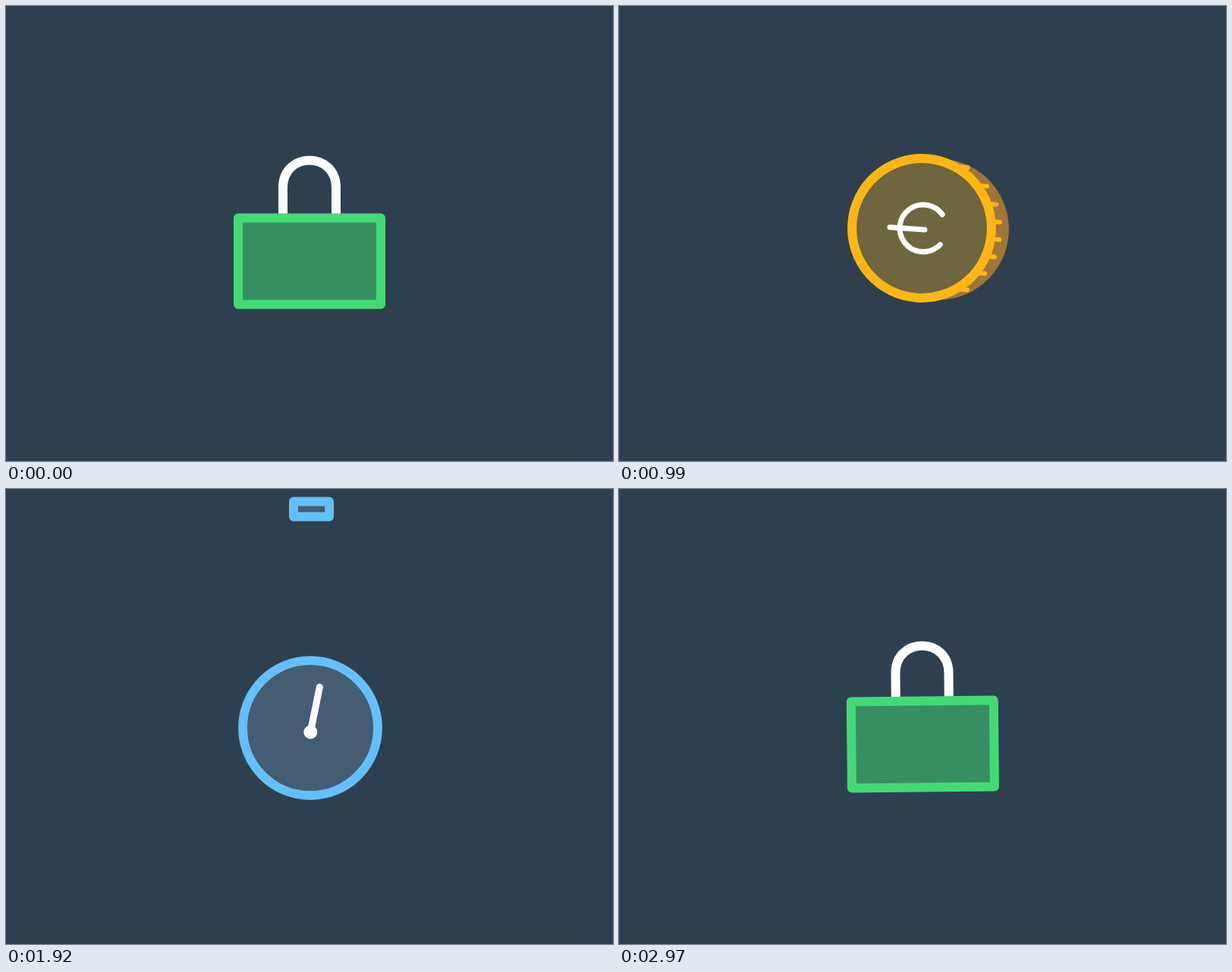
An HTML page with a canvas that plays this animation: 800x600 px, repeating every 3000 ms.

```html
<!DOCTYPE html>
<html lang="en">
<head>
<meta charset="utf-8">
<title>Lock, coin, stopwatch</title>
<style>
html, body { margin: 0; width: 100%; height: 100%; overflow: hidden; background: #2e404f; }
canvas { display: block; }
</style>
</head>
<body>
<canvas id="stage" width="800" height="600"></canvas>
<script>
const ctx = document.getElementById('stage').getContext('2d');
const LOOP = 3000, STEP = 30, TAU = Math.PI * 2, RAD = Math.PI / 180, ARC = 0.2761;
const GREEN = [67, 218, 117], GREEN_FILL = [56, 142, 99];
const GOLD = [255, 182, 20], GOLD_FILL = [110, 102, 63];
const BLUE = [100, 191, 255], BLUE_FILL = [68, 93, 114];
const WHITE = [255, 255, 255], BACK = [46, 64, 79];

const lerp = (a, b, p) => a + (b - a) * p;
const rgb = color => `rgb(${color.map(Math.round)})`;
const mix = (a, b, p) => rgb(a.map((v, i) => lerp(v, b[i], p)));

const ramp = (t, a, b) => Math.min(1, Math.max(0, (t - a) / (b - a)));
const ease = (t, a, b) => {
  const u = ramp(t, a, b);
  return u < 0.5 ? 4 * u ** 3 : 1 - 4 * (1 - u) ** 3;
};
const backIn = u => u * u * (2.7 * u - 1.7);
const swing = (t, decay, period) => t < 0 ? 0 : Math.exp(-t / decay) * Math.sin(TAU * t / period);
const spring = t => t < 0 ? 0 : 1 - Math.exp(-t / 75) * Math.cos(TAU * t / 330);

function at(x, y, deg, draw, sx = 1, sy = sx) {
  ctx.save();
  ctx.translate(x, y);
  ctx.rotate(deg * RAD);
  ctx.scale(sx, sy);
  draw();
  ctx.restore();
}

function disc(x, y, r, color) {
  ctx.beginPath();
  ctx.arc(x, y, r, 0, TAU);
  ctx.fillStyle = color;
  ctx.fill();
}

function line(x0, y0, x1, y1) {
  ctx.beginPath();
  ctx.moveTo(x0, y0);
  ctx.lineTo(x1, y1);
  ctx.stroke();
}

function pen(color, width) {
  ctx.strokeStyle = color;
  ctx.lineWidth = width;
}

// Four-sided outline: round 0 is a rectangle, 1 a circle; the top side bulges on its own.
function blob(w, h, round, fill, stroke, bulge = round * ARC * w, along = ARC * w) {
  const x = w / 2, y = h / 2, ix = ARC * w, iy = ARC * h, ox = round * ix, oy = round * iy;
  ctx.beginPath();
  ctx.moveTo(-x, -y);
  ctx.bezierCurveTo(along - x, -y - bulge, x - along, -y - bulge, x, -y);
  ctx.bezierCurveTo(x + oy, iy - y, x + oy, y - iy, x, y);
  ctx.bezierCurveTo(x - ix, y + ox, ix - x, y + ox, -x, y);
  ctx.bezierCurveTo(-x - oy, y - iy, -x - oy, iy - y, -x, -y);
  ctx.closePath();
  ctx.fillStyle = fill;
  ctx.fill();
  pen(stroke, 12);
  ctx.stroke();
}

function coinSide(drawn, shift) {
  ctx.globalAlpha = drawn;
  disc(22 * shift, 0, 93, '#9e7638');
  ctx.globalAlpha = 1;
  pen(rgb(GOLD), 6);
  for (let i = 0; i < 8; i++) {
    const y = 23 * i - 84, x = Math.sqrt(97 * 97 - y * y);
    line(x - 6, y, x - 3 + 9.5 * drawn, y);
  }
}

function euro(drawn) {
  pen('#fff', 7);
  ctx.beginPath();
  ctx.arc(2, 0, 31, -40 * RAD, (-40 - 280 * drawn) * RAD, true);
  ctx.stroke();
  line(4, 1.7, 4 - 46 * drawn, 1.7);
}

function lockToCoin(t) {
  const morph = ease(t, 90, 390), drawn = ramp(t, 294, 534);
  const angle = ease(t, 90, 240) * (27.8 - 0.0241 * t);
  const swell = 14 * Math.sin(Math.PI * ramp(t, 60, 420));
  // The coin leaps, hangs, then drops off the stage.
  const fall = t - 1165, leap = 217 + fall * fall * (fall < 0 ? 0.00248 : 0.0065);
  const rest = lerp(336.5, 297.5, morph);
  const y = t < 900 ? rest : fall < 0 ? Math.min(rest, leap) : leap;

  if (t < 240) {
    const drop = 85 * backIn(ramp(t, 0, 210));
    at(400, 282 + drop, angle, () => blob(70, 85, 0, rgb(BACK), '#fff', 48, 0));
  }
  at(400 - morph, y, angle, () => {
    if (drawn) coinSide(drawn, ease(t, 270, 420));
    blob(lerp(188, 130, morph) + swell, lerp(114, 130, morph) + swell, morph,
      mix(GREEN_FILL, GOLD_FILL, morph), mix(GREEN, GOLD, morph));
    if (drawn) euro(drawn);
  });
}

function hand(t, x, y) {
  const size = spring(t - 1800) * (1 - ease(t, 2340, 2430));
  if (size <= 0) return;
  at(x, y, 360 * ease(t, 1830, 2280), () => {
    disc(0, 0, 8, '#fff');
    pen('#fff', 8);
    line(0, 0, 0, -53.5);
  }, size);
}

// The button becomes the lock body and the ring its shackle while both swing half a turn.
function watchToLock(t) {
  const pull = ease(t, 2310, 2480), square = ease(t, 2460, 2630), turn = ease(t, 2516.5, 2766.5);
  const grow = turn ** 0.76, home = turn ** 2, late = turn ** 3;
  const wobble = 7 * swing(t - 2740, 90, 131);
  const angle = 180 * turn + wobble;
  const dx = Math.sin(angle * RAD), dy = -Math.cos(angle * RAD);
  const px = 401 - pull;

  const body = () => {
    if (t < 1700) return;
    const hop = 21 + 0.0062 * (t - 1890) ** 2;
    const start = t < 1890 ? hop : Math.min(200, hop);
    const far = lerp(lerp(300 - start, 126, pull), 36.5, Math.sqrt(turn));
    at(px + 1.5 * (1 - pull) + dx * far, 300 + dy * far, angle - 180, () =>
      blob(lerp(47, 188, grow), lerp(20, 114, grow), 0,
        mix(BLUE_FILL, GREEN_FILL, grow), mix(BLUE, GREEN, grow)));
  };

  const ring = () => {
    const far = lerp(lerp(15, 152, pull), 18, home) + 6 * wobble;
    const sx = spring(t - 1586.5), sy = spring(t - 1588);
    const x = px - dx * far, y = 300 - dy * far;
    const w = lerp(lerp(127.3, 163.5, square), 70, late);
    const h = lerp(lerp(127.3, 148, square), 85, late);
    const round = 1 - square;
    at(x, y + 5 * (1 - sy), angle - 180, () =>
      blob(w, h, round, mix(BLUE_FILL, BACK, grow), mix(BLUE, WHITE, grow),
        round * ARC * w + 48 * home, round * ARC * w), sx, sy);
    hand(t, x + 0.3, y + 5.5);
  };

  const layers = t < 2400 ? [body, ring] : [ring, body];
  layers.forEach(draw => draw());
}

function frame(now) {
  const t = Math.floor(now % LOOP / STEP) * STEP;
  ctx.fillStyle = rgb(BACK);
  ctx.fillRect(0, 0, 800, 600);
  ctx.lineCap = ctx.lineJoin = 'round';
  if (t < 1560) lockToCoin(t);
  else watchToLock(t);
  requestAnimationFrame(frame);
}
requestAnimationFrame(frame);
</script>
</body>
</html>
```
